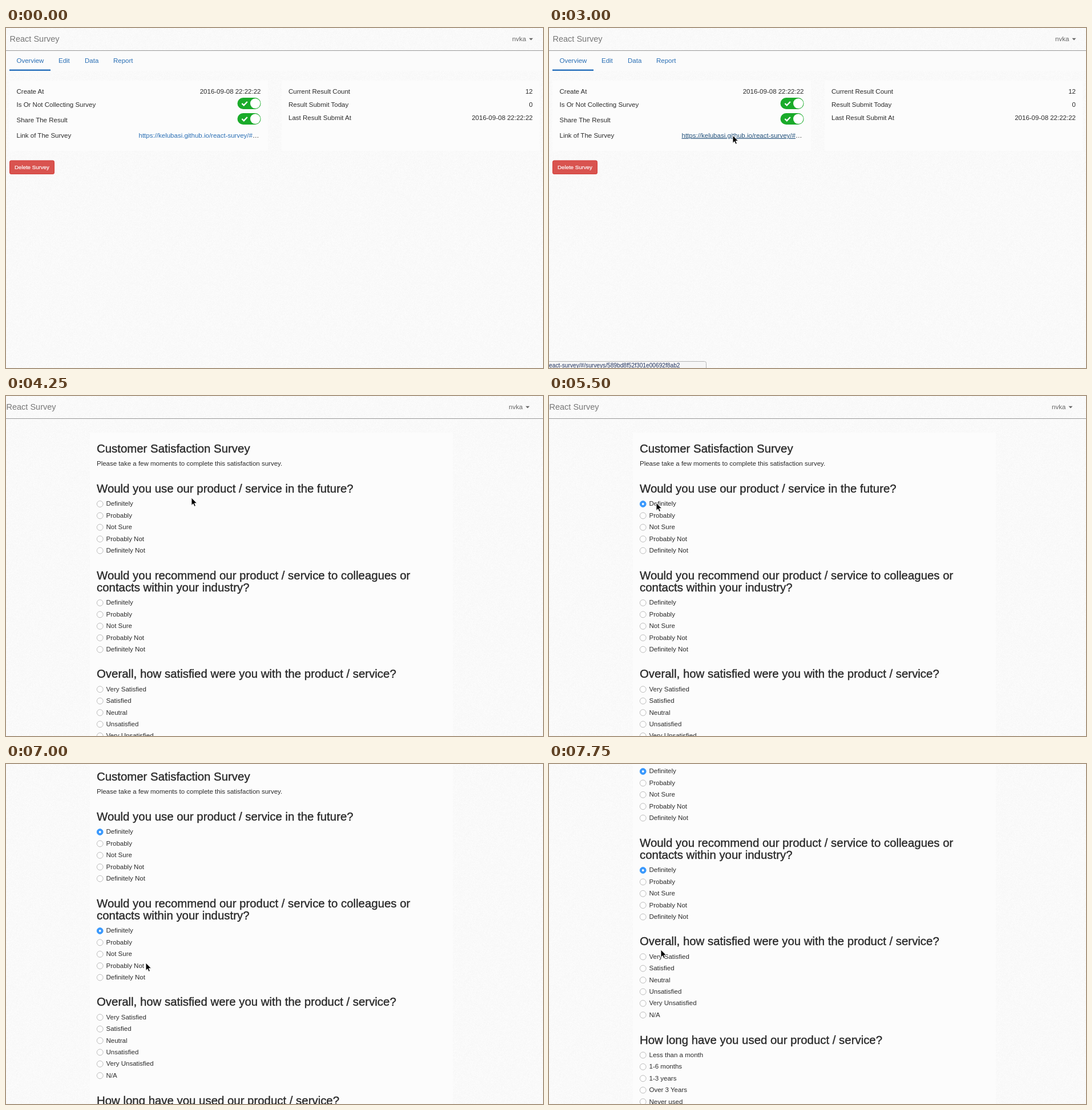
These frames come from a looping animation (941 by 595 pixels, 8000 ms). An HTML page with a canvas:

```html
<!DOCTYPE html>
<html lang="en">
<head>
<meta charset="utf-8">
<title>React Survey</title>
<style>
  html, body { margin: 0; width: 100%; height: 100%; overflow: hidden; background: #fafafa; }
  #paper, #stage { position: absolute; left: 0; top: 0; width: 941px; height: 595px; }
  #stage { overflow: hidden; }
  text { font: 11.5px "Liberation Sans", Arial, sans-serif; fill: #2b2b2b; white-space: pre; }
  .brand { font-size: 14.5px; fill: #777; }
  .user { fill: #666; }
  .head { font-size: 20.4px; stroke: #2b2b2b; stroke-width: .4px; }
  .link { fill: #2a6fb5; }
  .end { text-anchor: end; }
  .btn { font-size: 9.7px; fill: #fff; stroke: #fff; stroke-width: .2px; }
  .status { font-size: 10.2px; fill: #22335f; text-anchor: end; }
  .panel { fill: #fcfcfc; }
  .rule { fill: #999; }
  .radio { fill: #fff; stroke: #b9b9b9; }
  .on .radio { fill: #3b99fc; stroke: #3b99fc; }
  .dot { fill: #fff; visibility: hidden; }
  .on .dot { visibility: inherit; }
  .hover #url { fill: #23527c; text-decoration: underline; }
  #status { visibility: hidden; }
  .hover #status { visibility: inherit; }
</style>
</head>
<body>
<canvas id="paper" width="941" height="595"></canvas>
<svg id="stage" viewBox="0 0 941 595">
  <g id="overview"></g>
  <g id="survey"></g>
  <path id="cursor" d="M0 0V13.4L3.1 10.6 5.1 15.3 7.4 14.3 5.4 9.7H9.6Z" fill="#000" stroke="#fff" stroke-width=".9"/>
</svg>
<script>
const LOOP = 8000, STEP = 250;
const $ = id => document.getElementById(id);

const text = (x, y, s, cls = '') => `<text x="${x}" y="${y}" class="${cls}">${s}</text>`;
const rect = (x, y, w, h, attrs) => `<rect x="${x}" y="${y}" width="${w}" height="${h}" ${attrs}/>`;

const header = dx =>
  text(6.5 + dx, 23.7, 'React Survey', 'brand') +
  text(887 + dx, 23, 'nvka', 'user') +
  `<path d="M${916.5 + dx} 17.8h7l-3.5 3.6z" fill="#666"/>` +
  rect(0, 39, 941, 1, 'class="rule"');

const toggle = y =>
  rect(405.5, y - 10, 41, 20, 'rx="10" fill="#1aab2a"') +
  `<circle cx="436.8" cy="${y}" r="8.8" fill="#fff"/>` +
  `<path d="M413.4 ${y}l3.4 3.4 6-6.4" fill="none" stroke="#fff" stroke-width="2.4"/>`;

function overview() {
  const tabs = [[18.5, 'Overview'], [92, 'Edit'], [138, 'Data'], [188, 'Report']];
  return header(0) +
    rect(0, 40, 941, 35, 'fill="#fbfbfb"') +
    tabs.map(([x, s]) => text(x, 60.5, s, 'link')).join('') +
    rect(6, 72.5, 72, 2.5, 'fill="#2a72bd"') +
    rect(6, 92, 453, 123, 'class="panel"') + rect(483, 92, 452, 123, 'class="panel"') +
    text(18.5, 115, 'Create At') + text(446.5, 115, '2016-09-08 22:22:22', 'end') +
    text(18.5, 137.7, 'Is Or Not Collecting Survey') + toggle(132) +
    text(18.5, 164.7, 'Share The Result') + toggle(159) +
    text(18.5, 191.7, 'Link of The Survey') +
    text(232.5, 191.7, '<tspan id="url" class="link">https://kelubasi.github.io/react-survey/#</tspan>…') +
    text(495, 115, 'Current Result Count') + text(923, 115, '12', 'end') +
    text(495, 137.7, 'Result Submit Today') + text(923, 137.7, '0', 'end') +
    text(495, 160.5, 'Last Result Submit At') + text(923, 160.5, '2016-09-08 22:22:22', 'end') +
    rect(6.5, 232, 78, 23.5, 'rx="2.5" fill="#d9534f" stroke="#d43f3a"') +
    text(15, 247.2, 'Delete Survey', 'btn') +
    '<g id="status">' + rect(-5, 583.5, 280.5, 20, 'rx="3" fill="#f6f6f6" stroke="#b4b4b4"') +
    text(229.5, 593.6, 'react-survey/#/surveys/589bd8f52f301e00692f8ab2', 'status') + '</g>';
}

const likely = ['Definitely', 'Probably', 'Not Sure', 'Probably Not', 'Definitely Not'];
const questions = [
  [169, ['Would you use our product / service in the future?'], likely],
  [320.7, ['Would you recommend our product / service to colleagues or', 'contacts within your industry?'], likely],
  [493.3, ['Overall, how satisfied were you with the product / service?'],
    ['Very Satisfied', 'Satisfied', 'Neutral', 'Unsatisfied', 'Very Unsatisfied', 'N/A']],
  [665.5, ['How long have you used our product / service?'],
    ['Less than a month', '1-6 months', '1-3 years', 'Over 3 Years', 'Never used']]
];

function question([y, lines, options], q) {
  const first = y + (lines.length - 1) * 21.3 + 23.4;
  return lines.map((s, i) => text(159, y + i * 21.3, s, 'head')).join('') +
    options.map((s, i) => {
      const b = first + i * 20.4;
      return `<g id="q${q}o${i}"><circle class="radio" cx="164.7" cy="${b - 3.4}" r="5.4"/>` +
        `<circle class="dot" cx="164.7" cy="${b - 3.4}" r="1.9"/>` + text(175.5, b, s) + '</g>';
    }).join('');
}

const survey = () => header(-6) + rect(147, 64, 636, 900, 'class="panel"') +
  text(159, 98.7, 'Customer Satisfaction Survey', 'head') +
  text(159, 122.3, 'Please take a few moments to complete this satisfaction survey.') +
  questions.map(question).join('');

// Fine paper grain from a seeded generator
function paintPaper() {
  let seed = 7;
  const rand = () => (seed = (seed * 16807) % 2147483647) / 2147483647;
  const tile = document.createElement('canvas');
  tile.width = tile.height = 128;
  const c = tile.getContext('2d'), img = c.createImageData(128, 128);
  for (let i = 0; i < img.data.length; i += 4) {
    img.data.fill(247 + Math.floor(rand() * 6), i, i + 3);
    img.data[i + 3] = 255;
  }
  c.putImageData(img, 0, 0);
  const p = $('paper').getContext('2d');
  p.fillStyle = p.createPattern(tile, 'repeat');
  p.fillRect(0, 0, 941, 595);
}

// Pointer tip, one stop per step, starting at 500 ms
const path = [
  [43, 26], [74, 31], [105, 36], [137, 42], [167, 48],
  [237, 74], [238, 92], [300, 118], [341, 148], [323, 185],
  [322, 188], [322, 188], [323, 186], [324, 183], [324, 183],
  [325, 178], [300, 136], [273, 211], [222, 200], [205, 190],
  [188, 187], [194, 212], [200, 282], [202, 375], [205, 362],
  [205, 359], [245, 348], [287, 329], [245, 338], [196, 325]
];
const scrolls = [[7500, 176], [7250, 153], [7000, 70], [0, 0]];
const show = (el, on) => el.setAttribute('visibility', on ? 'visible' : 'hidden');

function draw(now) {
  const t = now % LOOP;
  const tip = path[Math.floor((t - 500) / STEP)];
  show($('cursor'), tip);
  if (tip) $('cursor').setAttribute('transform', `translate(${tip})`);
  show($('overview'), t < 3500);
  show($('survey'), t >= 4250);
  $('overview').classList.toggle('hover', t >= 2750 && t < 3500);
  $('q0o0').classList.toggle('on', t >= 5500);
  $('q1o0').classList.toggle('on', t >= 6500);
  const scroll = scrolls.find(([from]) => t >= from)[1];
  $('survey').setAttribute('transform', `translate(0 ${-scroll})`);
}

paintPaper();
$('overview').innerHTML = overview();
$('survey').innerHTML = survey();
const start = performance.now();
function tick() {
  draw(performance.now() - start);
  requestAnimationFrame(tick);
}
tick();
</script>
</body>
</html>
```
